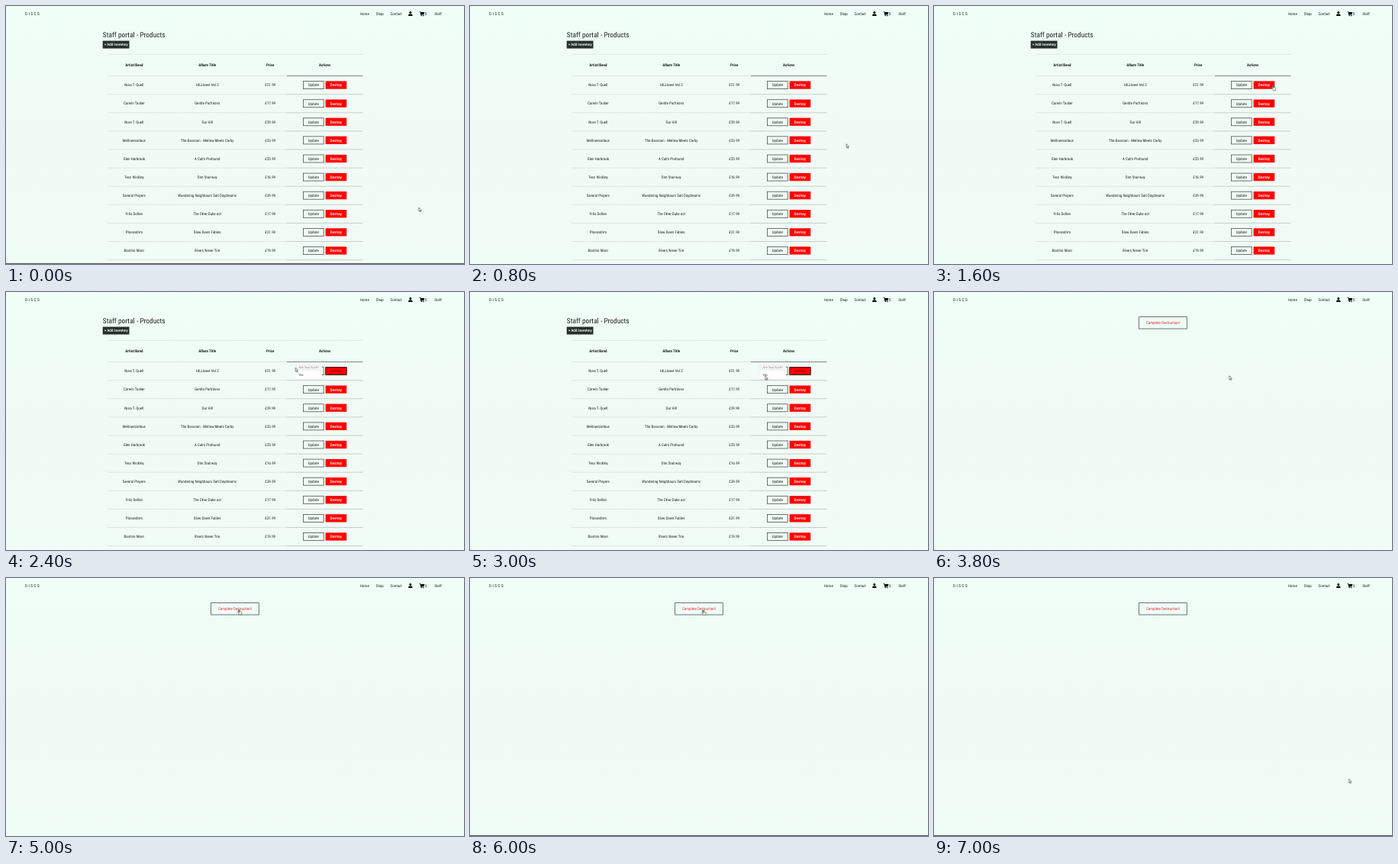
An HTML page for the animation above (7.2 s loop, 600 by 338 pixels).

```html
<!DOCTYPE html>
<html lang="en">
<head>
<meta charset="utf-8">
<title>Staff portal</title>
<style>
html, body { margin: 0; width: 100%; height: 100%; overflow: hidden; }
body { background: linear-gradient(#effef7, #f1fbf5 50%, #f0fcf6); }
svg { display: block; width: 100%; height: 100%; }
text {
  font: 5px "Roboto Condensed", Roboto, sans-serif;
  font-stretch: 75%;
  text-rendering: geometricPrecision;
  fill: #1d2421;
}
.bold { font-weight: 700; }
.mid { font-weight: 500; }
.title { font-size: 9.375px; }
.brand { font-size: 5.3px; letter-spacing: 1.5px; }
.light { fill: #fff; }
.red { fill: #e5242b; }
.tip { font: 4.1px "Open Sans", sans-serif; }
.grey { fill: #858b88; }
.rule { stroke: #d0d9d4; stroke-width: .6; }
.rule.dark { stroke: #a9b1ad; }
.rule.head { stroke: #5b625f; stroke-width: .8; }
.box { fill: none; stroke: #4a5450; stroke-width: .8; }

.anim { animation: 7.2s step-end infinite; }
#list { animation-name: list; }
#done { animation-name: done; }
#popup, #pressed { animation-name: popup; }
#edge { animation-name: edge; }
#arrow { animation-name: arrow; }
#hand { animation-name: hand; }
#cursor { animation: move 7.2s linear infinite; }

@keyframes list { 0% { visibility: visible } 52.77%, 100% { visibility: hidden } }
@keyframes done { 0% { visibility: hidden } 52.77%, 100% { visibility: visible } }
@keyframes popup { 0% { opacity: 0 } 26.38% { opacity: 1 } 47.22%, 100% { opacity: 0 } }
@keyframes edge { 0% { opacity: 1 } 4.16% { opacity: 0 } 80.55%, 100% { opacity: 1 } }
@keyframes arrow {
  0% { opacity: 1 } 20.83% { opacity: 0 } 26.38% { opacity: 1 }
  69.44% { opacity: 0 } 84.72%, 100% { opacity: 1 }
}
@keyframes hand {
  0% { opacity: 0 } 20.83% { opacity: 1 } 26.38% { opacity: 0 }
  69.44% { opacity: 1 } 84.72%, 100% { opacity: 0 }
}
@keyframes move {
  0%     { transform: translate(540.8px, 264px); animation-timing-function: steps(4) }
  5.55%  { transform: translate(535px, 254px); animation-timing-function: steps(6) }
  13.88% { transform: translate(472px, 144px); animation-timing-function: steps(5) }
  20.83% { transform: translate(444.7px, 103.8px) }
  26.38% { transform: translate(444.7px, 103.8px); animation-timing-function: steps(5) }
  33.33% { transform: translate(379.2px, 99.3px); animation-timing-function: steps(6) }
  41.66% { transform: translate(386.8px, 109.8px) }
  56.94% { transform: translate(386.8px, 109.8px); animation-timing-function: steps(4) }
  62.5%  { transform: translate(310px, 89px) }
  63.88% { transform: translate(310px, 89px); animation-timing-function: steps(4) }
  69.44% { transform: translate(306px, 41.3px) }
  81.94% { transform: translate(306px, 41.3px); animation-timing-function: step-end }
  83.33% { transform: translate(306.3px, 41.8px) }
  84.72% { transform: translate(306.3px, 41.8px); animation-timing-function: steps(4) }
  90.27% { transform: translate(541px, 274px); animation-timing-function: steps(2) }
  93.05% { transform: translate(543px, 266px) }
  94.44% { transform: translate(543px, 266px); animation-timing-function: steps(2) }
  97.22%, 100% { transform: translate(543.5px, 263.3px) }
}
</style>
</head>
<body>
<svg viewBox="0 0 600 338" preserveAspectRatio="none">
  <g id="nav">
    <circle cx="529.8" cy="8.5" r="1.5"/>
    <path d="M527.1 13v-.9q0-1.7 1.7-1.7h2q1.7 0 1.7 1.7v.9z"/>
    <path d="M541.6 7.2h1.5l.2.9h5l-.8 3h-3.5l.1.5h3.2v.6h-3.9l-.9-4.3h-.9z"/>
    <circle cx="544.3" cy="12.7" r=".65"/>
    <circle cx="547" cy="12.7" r=".65"/>
  </g>
  <g id="list" class="anim">
    <rect x="126.7" y="45.6" width="34.8" height="10" fill="#26302b"/>
  </g>
  <g id="done" class="anim">
    <rect class="box" x="268.6" y="32.6" width="62.7" height="15.5"/>
  </g>
  <g id="pressed" class="anim">
    <rect x="418.8" y="98.7" width="27.3" height="9.9" fill="#f00" stroke="#200" stroke-width=".9"/>
  </g>
  <g id="popup" class="anim">
    <rect x="378.9" y="92.9" width="35.2" height="22.2" rx="1.4" fill="#00000018"/>
    <rect x="379.2" y="92.6" width="34.5" height="22" rx="1.2" fill="#fdfefd"/>
    <path d="M379.2 103v-9.2q0-1.2 1.2-1.2h32.1q1.2 0 1.2 1.2v9.2z" fill="#f2f4f3"/>
  </g>
  <rect id="edge" class="anim" y="337" width="600" height="1" fill="#4b504e"/>
  <g id="cursor" fill="#fff" stroke="#222" stroke-width=".55" stroke-linejoin="round">
    <path id="arrow" class="anim" d="M0 0V5L1.1 4 1.9 5.8 2.7 5.4 1.9 3.7H3.5Z"/>
    <path id="hand" class="anim" d="M-.6 .6Q0-.3 .6 .6V2.7L2.6 3.1Q3.1 3.3 3 4L2.5 6.8H-.5L-2.1 4.4Q-2-3.6-.6 4.2Z"/>
  </g>
</svg>
<script>
const NS = "http://www.w3.org/2000/svg";
const $ = id => document.getElementById(id);

function add(parent, tag, attrs, content = "") {
  const el = document.createElementNS(NS, tag);
  for (const key in attrs) el.setAttribute(key, attrs[key]);
  el.textContent = content;
  parent.append(el);
  return el;
}

// If no condensed face is installed, narrow every label alike.
function widthOf(stretch) {
  const el = add($("nav"), "text", { style: `font-size:100px;font-stretch:${stretch}` }, "Complete");
  const width = el.getComputedTextLength();
  el.remove();
  return width;
}
const narrow = widthOf("75%") < widthOf("100%") * .95 || widthOf("100%") < 400 ? 1 : .89;

function label(id, x, y, content, cls = "", anchor = "start") {
  const k = cls.includes("tip") ? 1 : narrow;
  add($(id), "text", {
    transform: `translate(${x} ${y}) scale(${k} 1)`, class: cls, "text-anchor": anchor
  }, content);
}
const centred = (id, x, y, content, cls) => label(id, x, y, content, cls, "middle");
const rule = (x1, x2, y, cls = "") => add($("list"), "line", { x1, x2, y1: y, y2: y, class: "rule " + cls });

label("nav", 25, 11.8, "DISCS", "brand");
[["Home", 464], ["Shop", 484.8], ["Contact", 503.4], ["0", 549], ["Staff", 561.2]]
  .forEach(([name, x]) => label("nav", x, 11.7, name));

label("list", 126.8, 41.4, "Staff portal - Products", "title");
label("list", 128.7, 52.3, "+ Add inventory", "light mid");

const columns = [167.8, 263.7, 346.2, 417.7];
["Artist/Band", "Album Title", "Price", "Actions"]
  .forEach((name, i) => centred("list", columns[i], 79, name, "bold"));
rule(132.5, 467.5, 63.3);
rule(132.5, 368, 91.6);
rule(368, 467.5, 91.6, "head");

const albums = [
  ["Nora T. Quell", "HILLtown Vol 2", 21],
  ["Corwin Tasker", "Gentle Partitions", 17],
  ["Nora T. Quell", "Our Hill", 29],
  ["Mellowrandous", "The Bassoon - Mellow Meets Corby", 23],
  ["Glen Harbrook", "A Calm Profound", 25],
  ["Tess Wickley", "Dim Stairway", 16],
  ["Several Players", "Wandering Neighbours Salt Daydreams", 39],
  ["Fritz Dollen", "The Otter Duke ost", 17],
  ["Plovandrim", "Slow Dawn Fables", 21],
  ["Bastino Moor", "Rivers Never Tire", 19]
];
albums.forEach(([artist, title, pounds], i) => {
  const y = 103.6 + i * 24.1;
  [artist, title, `£${pounds}.99`].forEach((s, c) => centred("list", columns[c], y + 1.7, s));
  add($("list"), "rect", { class: "box", x: 389.5, y: y - 5, width: 26.7, height: 10 });
  add($("list"), "rect", { x: 418.6, y: y - 5.2, width: 27.6, height: 10.3, fill: "#f00" });
  centred("list", 402.8, y + 1.8, "Update");
  centred("list", 432.4, y + 1.8, "Destroy", "light mid");
  rule(132.5, 368, y + 12.1);
  rule(368, 467.5, y + 12.1, "dark");
});

centred("done", 300, 42.2, "Complete Destruction!", "red");
add($("pressed"), "g", { id: "pressedText", fill: "#8a0000" });
centred("pressed", 432.4, 105.4, "Destroy", "mid");
$("pressed").lastChild.style.fill = "#9c0808";
$("pressedText").remove();
label("popup", 383.4, 99.6, "Are You Sure?", "tip grey");
label("popup", 383.4, 110.2, "Yes", "tip");
</script>
</body>
</html>
```
